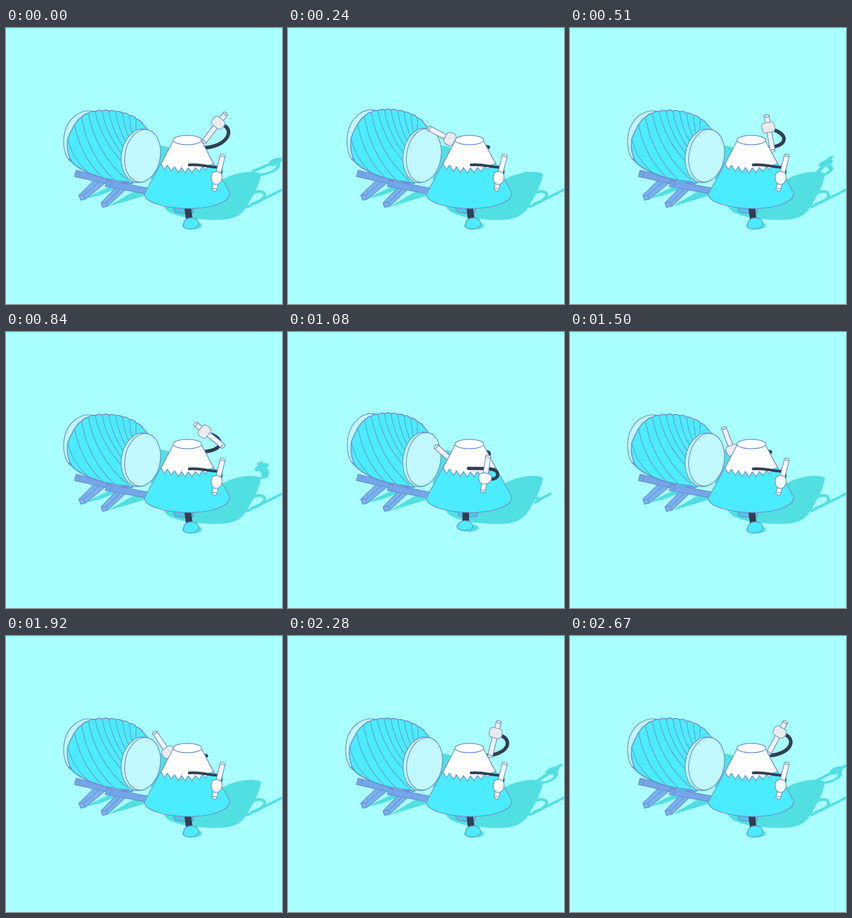
An HTML page with a canvas that plays this animation: 500x500 px, repeating every 2.7 s.

```html
<!DOCTYPE html>
<html lang="en">
<head>
<meta charset="utf-8">
<title>Drumming mountain</title>
<style>
html, body { margin: 0; width: 100%; height: 100%; overflow: hidden; background: #aaffff; }
canvas { display: block; width: 500px; height: 500px; }
</style>
</head>
<body>
<canvas id="stage" width="500" height="500"></canvas>
<script>
const ctx = document.getElementById('stage').getContext('2d');
const LOOP = 2700, STEP = 30;
const BG = '#aaffff', CYAN = '#4cecff', PALE = '#c2f8ff', LINE = '#6b92cd',
      WOOD = '#7ab2f1', BEAM = '#74a6ea', SHADE = '#52dfe2', DARK = '#313f51', GREY = '#ebebed';

// Drum hits, and how far the arm lifts on the way to each one
const hits = [270, 1080, 1290, 1710, 2040, 2460];
const lifts = [.98, 1, .1, .1, .13, .94];
const RIBS = 11, TEETH = 7;

const lerp = (a, b, p) => a + (b - a) * p;
const cubic = (a, b, c, d, u) => {
  const v = 1 - u;
  return v * v * v * a + 3 * v * v * u * b + 3 * v * u * u * c + u * u * u * d;
};

function pulse(t, times) {
  const p = Math.max(0, ...times.map(h => 1 - Math.abs(t - h) / 100));
  return p * p * (3 - 2 * p);
}

// The hand rides an arc from the drum to behind the head; the stick leads on the way down
function armPose(t) {
  const i = hits.findIndex(h => h > t);
  const k = i < 0 ? 0 : i;
  const next = i < 0 ? hits[0] + LOOP : hits[i];
  const prev = k ? hits[k - 1] : next - hits[0] - LOOP + hits[hits.length - 1];
  const q = (t - prev) / (next - prev);
  const u = lifts[k] * Math.sin(Math.PI * q);
  const lead = 120 * Math.sin(Math.PI * u) * Math.max(0, -Math.cos(Math.PI * q));
  return {
    x: cubic(300, 270, 345, 388, u),
    y: cubic(236, 150, 200, 170, u),
    angle: (lerp(-138, 134, u) - lead) * Math.PI / 180
  };
}

// Blend two path strings that share the same commands
function blend(a, b, p) {
  const n = b.match(/-?[\d.]+/g);
  let i = 0;
  return a.replace(/-?[\d.]+/g, v => lerp(+v, +n[i++], p));
}

function paint(fill, stroke, width) {
  if (fill) { ctx.fillStyle = fill; ctx.fill(); }
  if (stroke) { ctx.strokeStyle = stroke; ctx.lineWidth = width; ctx.stroke(); }
}

function shape(d, fill, stroke = LINE, width = 1.4) {
  const path = new Path2D(d);
  if (fill) { ctx.fillStyle = fill; ctx.fill(path); }
  if (stroke) { ctx.strokeStyle = stroke; ctx.lineWidth = width; ctx.stroke(path); }
}

function oval(x, y, rx, ry, turn, fill, stroke = LINE) {
  ctx.beginPath();
  ctx.ellipse(x, y, rx, ry, turn, 0, Math.PI * 2);
  paint(fill, stroke, 1.4);
}

// Stick along the x axis
function stick(from, to, w, fill) {
  ctx.beginPath();
  ctx.rect(from, -w / 2, to - from, w);
  paint(fill, LINE, 1.4);
  oval(from, 0, 2.2, w / 2, 0, fill);
  oval(to, 0, 2.2, w / 2, 0, fill);
}

function farArmPath({ x, y }) {
  const d = x - 386;
  return `M357 217 C${402 + d * .3} 215 ${413 + d * .65} ${y + 14} ${x + 11} ${y + 5}`;
}

function shadows(arm, p) {
  shape('M286 322 C290 340 340 350 398 347 C420 344 432 334 441 315 C452 296 460 280 462 264 C449 257 415 260 388 277 Z', SHADE, null);
  shape('M274 213 Q296 212 306 225 L306 262 L262 275 Z', SHADE, null);
  shape('M142 309 L205 279 L230 280 L168 304 Z', SHADE, null);
  shape('M184 324 L240 291 L260 296 L258 302 Z', SHADE, null);

  // Cast shadow of the raised arm
  ctx.save();
  ctx.beginPath();
  ctx.rect(428, 200, 72, 140);
  ctx.clip();
  ctx.transform(.75, .1, -.66, .6, 312.3, 101);
  shape(farArmPath(arm), null, SHADE, 8);
  ctx.translate(arm.x, arm.y);
  ctx.rotate(arm.angle);
  ctx.fillStyle = SHADE;
  ctx.fillRect(-21, -5, 64, 10);
  oval(0, 0, 12, 13, 0, SHADE, null);
  ctx.restore();

  shape(blend('M438 304 C458 290 474 297 467 307 C463 313 455 316 445 319',
              'M438 304 C446 302 454 299 455 302 C456 304 454 306 447 309', p), null, SHADE, 5);
  shape(blend('M436 325 L504 291', 'M446 309 L477 292', p), null, SHADE, 4.5);
}

function stand() {
  shape('M164 272 L132 303 L135 312 L144 310 L184 277 Z', WOOD);
  shape('M132 303 L141 303 L144 310 M141 303 L174 274', null);
  shape('M207 281 L172 317 L175 325 L184 323 L230 280 Z', WOOD);
  shape('M172 317 L182 316 L184 323 M182 316 L219 280', null);
  shape('M127 258 L190 273 L190 284 L124 269 Z', BEAM);
  shape('M127 258 L135 260 L132 271', null);
  shape('M183 276 L262 291 L262 302 L180 287 Z', BEAM);
  shape('M183 276 L190 278 L187 289', null);
}

// Upper and lower end of the rib at s, from the back of the drum to the front
const ribTop = s => [lerp(112, 248, s), 149 + 51 * (1 - s) ** 7 + 25 * s ** 5];
const ribEnd = s => [Math.min(235, 152 + 250 * s), Math.min(264 + 70 * s, 310 - 125 * s)];

function drum(hit) {
  ctx.save();
  ctx.translate(195, 265);
  ctx.scale(1 - .035 * hit, 1 + .02 * hit);
  ctx.translate(-195, -265);
  shape('M158 151 C134 146 112 164 106 190 C102 212 106 235 119 243 Z', PALE);

  let rim = 'M' + ribTop(0), ribs = '';
  for (let i = 0; i < RIBS; i++) {
    const s = i / RIBS, [x, y] = ribTop(s), [u, v] = ribEnd(s);
    const [mx, my] = ribTop(s + .5 / RIBS);
    rim += `Q${mx + 1} ${my - 3} ${ribTop(s + 1 / RIBS)}`;
    ribs += `M${x} ${y}Q${lerp(x, u, .2)} ${lerp(y, v, .6)} ${u} ${v}`;
  }
  shape(rim + 'L257 184 L230 281 C185 277 145 265 122 246 Q108 228 112 200 Z', CYAN, LINE, 1.8);
  shape(ribs, null, LINE, 1.2);
  shape('M114 236 C126 254 160 274 222 279', null, LINE, 1.8);
  oval(243.5, 231.5, 34.5, 49, .17, PALE);
  oval(247.5, 231.5, 32, 48, .17, PALE);
  ctx.restore();
}

function farArm(arm) {
  shape(farArmPath(arm), null, DARK, 6.5);
  ctx.save();
  ctx.translate(arm.x, arm.y);
  ctx.rotate(arm.angle);
  stick(-21, 43, 9, '#f2f2f5');
  ctx.beginPath();
  ctx.roundRect(-9, -11, 18, 23, 6);
  paint(GREY, LINE, 1.2);
  ctx.restore();
}

function feet(p) {
  oval(lerp(337, 327, p), lerp(358, 355, p), 18, 7, 0, SHADE, null);
  shape(blend('M304 326 C303 337 315 336 339 335 L340 326 Z',
              'M308 326 C308 337 320 336 343 334 L344 326 Z', p), '#50c5e3');
  shape(blend('M329 324 L332 347', 'M322 324 L322 344', p), null, DARK, 12);
  shape(blend('M322 360 C320 350 326 344 336 344 C346 344 351 351 348 358 C343 366 325 366 322 360 Z',
              'M306 353 C308 345 315 341 323 342 C331 342 337 350 333 357 C326 361 308 360 306 353 Z', p), CYAN);
}

function mountain() {
  shape('M303 205 L251 300 C249 315 288 327 330 327 C374 327 407 315 405 298 L354 205 Z', CYAN);
  let snow = 'M303 204 L281 246';
  for (let i = 0; i < TEETH; i++) {
    const sag = 8 * Math.sin(Math.PI * (i + .5) / TEETH), x = 287 + 12.6 * i;
    snow += `L${x} ${255 + sag} L${x + 5.5} ${247 + sag * .8}`;
  }
  shape(snow + 'L376 246 L354 204 Z', '#fff');
  oval(328.5, 203, 26, 8.5, 0, '#fff');
}

function nearArm(p) {
  ctx.lineCap = 'round';
  shape(blend('M332 248 C350 246 368 252 380 252 C391 252 391 260 388 266',
              'M327 247 C350 248 378 244 380 257 C380 267 370 267 362 266', p),
        null, DARK, lerp(5, 6, p));
  ctx.lineCap = 'butt';
  ctx.save();
  ctx.translate(lerp(381, 358, p), lerp(271, 266, p));
  ctx.save();
  ctx.translate(lerp(4, 0, p), -9);
  ctx.rotate(lerp(-1.325, -1.42, p));
  stick(-32, 32, 9, '#fff');
  ctx.restore();
  shape(blend('M-7 -9 C0 -12 8 -12 10 -5 C12 4 7 13 0 12 C-8 13 -12 2 -7 -9 Z',
              'M-11 -9 C-4 -12 6 -11 10 -6 C13 2 7 10 -1 9 C-10 11 -15 1 -11 -9 Z', p), '#fff');
  ctx.restore();
}

function draw(t) {
  const arm = armPose(t), step = pulse(t, hits.slice(1));
  ctx.fillStyle = BG;
  ctx.fillRect(0, 0, 500, 500);
  ctx.lineJoin = 'round';
  shadows(arm, step);
  stand();
  drum(pulse(t, hits));
  farArm(arm);
  feet(step);
  mountain();
  nearArm(step);
}

const start = performance.now();
function tick() {
  const t = (performance.now() - start) % LOOP;
  draw(Math.floor(t / STEP) * STEP);
  requestAnimationFrame(tick);
}
tick();
</script>
</body>
</html>
```
